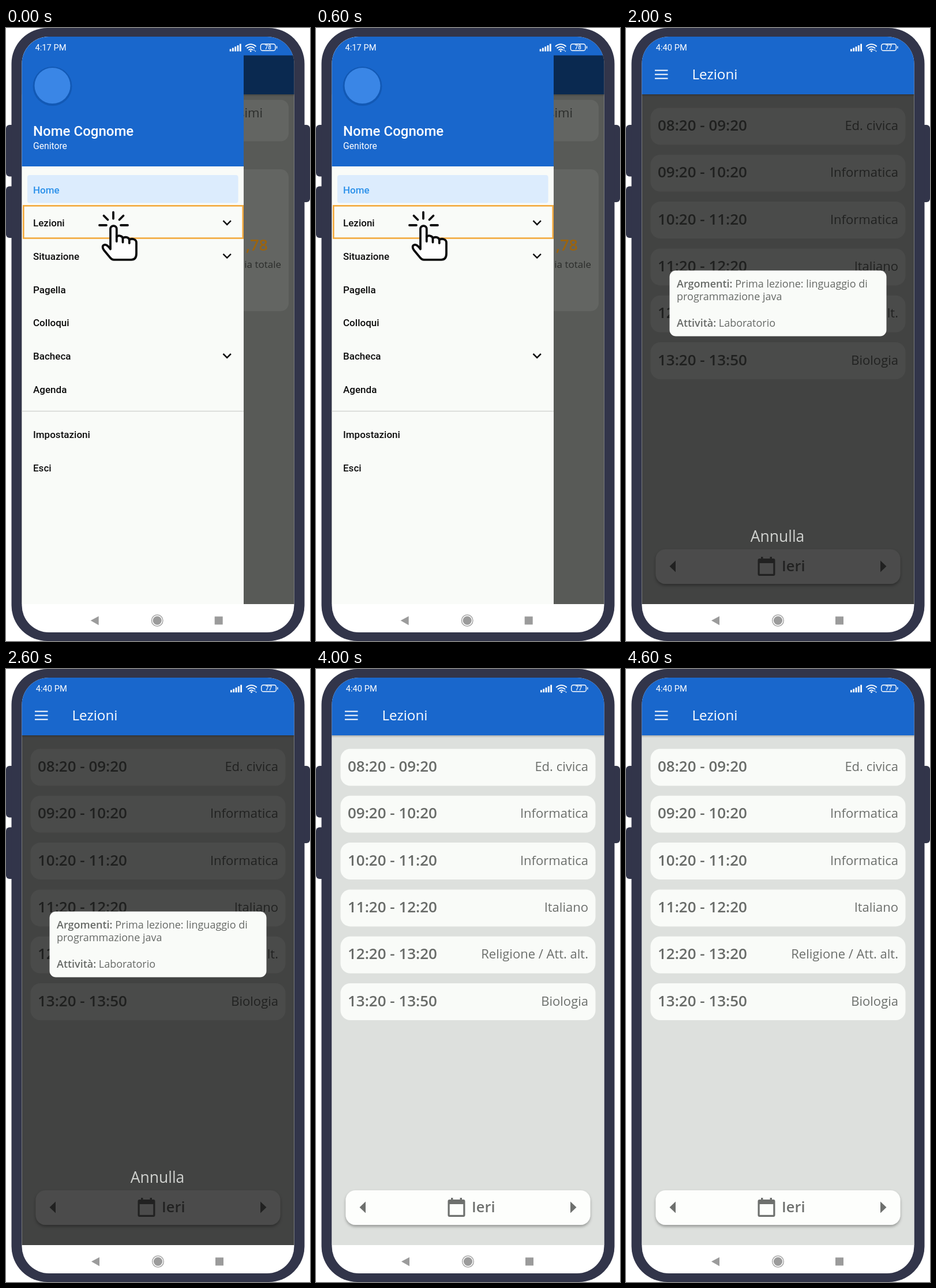
Animation of 527x1063 px, one loop 5000 ms. Source, as an HTML page:

```html
<!DOCTYPE html>
<html lang="it">
<head>
<meta charset="utf-8">
<title>Lezioni</title>
<style>
  html, body { margin: 0; width: 100%; height: 100%; overflow: hidden; background: #fff; }
  svg { display: block; width: 527px; height: 1063px; }
  text { font-family: "Open Sans", "Noto Sans", sans-serif; }
  .ui { font-family: Roboto, sans-serif; }
  .med { font-weight: 500; }
  .semi { font-weight: 600; }
  .end { text-anchor: end; }
  .mid { text-anchor: middle; }
</style>
</head>
<body>
<svg viewBox="0 0 527 1063">
  <defs>
    <clipPath id="screen"><rect x="27.5" y="15" width="472" height="1033" rx="47"/></clipPath>
    <linearGradient id="fade" x2="0" y2="1">
      <stop stop-color="#000" stop-opacity=".22"/>
      <stop offset="1" stop-color="#000" stop-opacity="0"/>
    </linearGradient>
    <filter id="soft" x="-10%" y="-20%" width="120%" height="150%">
      <feDropShadow dx="0" dy="3" stdDeviation="2.5" flood-opacity=".32"/>
    </filter>
    <g id="hand" stroke="#0b0b0b" stroke-width="3.8" stroke-linecap="round" stroke-linejoin="round">
      <path fill="none" d="M186 319.500V330.500M169.500 325.500L176.500 332.500M203.500 325.500L196.500 332.500M162 342H174M199 342H211"/>
      <path fill="#fff" d="M181 383.500V348.500a5.400 5.400 0 0 1 10.800 0V362.500c2-3.500 9.500-3 10.700 2c3.500-3 10-2 11.300 2.600c4-2.500 12.200-1.500 12.200 5.400V391q0 10.800-9 10.800H187q-3.500 0-6-3l-11-13.300c-3-3.800-3.500-8.500.5-9.500c4-1 7.500 3 10.500 7.500Z"/>
      <path fill="none" d="M191.800 361V370M202.500 364.500V371.500M213.800 367V373"/>
    </g>
    <g id="signal" fill="#fff">
      <path d="M389 36.500h2.800v4h-2.800zM393.300 34.500h2.800v6h-2.800zM397.600 32.300h2.800v8.200h-2.800zM401.900 30h2.800v10.500h-2.800zM406.200 27.500h2.800v13h-2.800z"/>
      <g fill="none" stroke="#fff" stroke-width="1.9" stroke-linecap="round">
        <path d="M416.800 31.500a13 13 0 0 1 17.400 0M419.600 34.800a8.800 8.800 0 0 1 11.800 0M422.400 37.900a4.600 4.600 0 0 1 6.200 0"/>
        <rect x="442.700" y="27.700" width="25.600" height="11.600" rx="3.600" stroke-width="1.400"/>
        <path d="M470.800 32V35" stroke-width="1.500"/>
      </g>
      <circle cx="425.500" cy="40" r="1.500"/>
      <path d="M430 39l1.300-2 1.300 2zM432.200 39.500h2.600l-1.300 2z"/>
    </g>
    <g id="nav" fill="#9b9b9b">
      <path d="M148 1027.500L162 1020V1035.500Z"/>
      <circle cx="263.500" cy="1027.500" r="7.600"/>
      <circle cx="263.500" cy="1027.500" r="9.800" fill="none" stroke="#9b9b9b" stroke-width="1.300"/>
      <rect x="363" y="1020.500" width="14" height="14"/>
    </g>
  </defs>

  <g fill="#32354a">
    <rect y="168" width="20" height="89.500" rx="6"/>
    <rect y="274.500" width="20" height="89.500" rx="6"/>
    <rect x="507" y="168" width="20" height="134" rx="6"/>
    <rect x="9.500" width="508" height="1063" rx="62"/>
  </g>

  <g clip-path="url(#screen)">
    <rect x="27" y="15" width="474" height="1034" fill="#fff"/>

    <g id="menu">
      <rect x="27" y="47" width="474" height="952" fill="#585a57"/>
      <rect x="27" y="47" width="474" height="68" fill="#0a2950"/>
      <rect x="27" y="115" width="474" height="4" fill="url(#fade)"/>
      <g fill="#636562">
        <rect x="300" y="124.500" width="190" height="72" rx="14"/>
        <rect x="300" y="245" width="190" height="246" rx="14"/>
      </g>
      <text class="end" x="445" y="155" font-size="22" fill="#2b2d2b">simi</text>
      <text class="end semi" x="454" y="386" font-size="27" fill="#9b640f">,78</text>
      <text class="end" x="477" y="416" font-size="17" fill="#2b2d2b">Media totale</text>
      <rect x="27" y="15" width="385" height="984" fill="#f9fbf8"/>
      <path fill="#1967cc" d="M27 15H501V47.500H412V240H27Z"/>
      <circle cx="80.500" cy="101" r="34" fill="#1259b5"/>
      <circle cx="80.500" cy="100" r="31" fill="#3a86e6"/>
      <text class="ui med" x="47" y="186.500" font-size="24" fill="#fff">Nome Cognome</text>
      <text class="ui" x="47" y="209.500" font-size="15.700" fill="#fff">Genitore</text>
      <rect x="37" y="255" width="365.500" height="48.500" rx="4" fill="#dcecfd"/>
      <g id="items"></g>
      <path d="M27 664.500H412" stroke="#d3d5d2" stroke-width="1.500"/>
      <rect x="30.300" y="308.300" width="380.400" height="56.200" fill="none" stroke="#f3a93c" stroke-width="2.600"/>
      <text class="ui" x="50.500" y="39" font-size="14.700" fill="#fff">4:17 PM</text>
      <use href="#signal" x="-1.300"/>
      <text class="ui med mid" x="454.200" y="37.300" font-size="10" fill="#fff">78</text>
      <use href="#nav" x="-1.300"/>
    </g>

    <g id="lessons">
      <rect x="27" y="115" width="474" height="884" fill="#dde0dd"/>
      <rect x="27" y="115" width="474" height="4" fill="url(#fade)"/>
      <g id="rows"></g>
      <rect x="51.500" y="904" width="424" height="60" rx="17" fill="#fdfefc" filter="url(#soft)"/>
      <g fill="#6e706e">
        <path d="M75.500 933.500L86 923.500V943.500ZM451.500 933.500L441 923.500V943.500Z"/>
        <path fill-rule="evenodd" d="M231.500 920H234V917H237.500V920H249.500V917H253V920H255.500q3 0 3 3V947q0 3-3 3H231.500q-3 0-3-3V923q0-3 3-3ZM231.700 928V946.800H255.300V928Z"/>
        <text class="semi" x="270" y="942" font-size="25.500">Ieri</text>
      </g>
      <rect id="dim" x="27" y="115" width="474" height="884" opacity=".7"/>
      <rect x="27" y="15" width="474" height="100" fill="#1967cc"/>
      <path d="M50 73.500H72.500M50 80.500H72.500M50 87.500H72.500" stroke="#fff" stroke-width="2.200"/>
      <text x="114.500" y="89" font-size="24.200" fill="#fff">Lezioni</text>
      <text class="ui" x="51.800" y="39" font-size="14.700" fill="#fff">4:40 PM</text>
      <use href="#signal"/>
      <text class="ui med mid" x="455.500" y="37.300" font-size="10" fill="#fff">77</text>
      <use href="#nav"/>
    </g>

    <rect id="pick" x="43.300" y="302.300" width="440.400" height="61.400" fill="none" stroke="#f3a93c" stroke-width="2.600"/>

    <g id="dialog" font-size="18" fill="#666966">
      <rect x="75.500" y="420.500" width="376" height="114" rx="11" fill="#f9fbf8"/>
      <text x="88" y="449.500"><tspan class="semi">Argomenti:</tspan> Prima lezione: linguaggio di</text>
      <text x="88" y="471.500">programmazione java</text>
      <text x="88" y="517.500"><tspan class="semi">Attività:</tspan> Laboratorio</text>
      <text class="mid" x="262.500" y="891" font-size="26.500" fill="#d0d2cf">Annulla</text>
    </g>

    <use id="tap" href="#hand"/>
  </g>
</svg>
<script>
const $ = id => document.getElementById(id);

const chevron = y =>
  `<path d="M376.500 ${y - 4}l6.700 6.700 6.700-6.700" fill="none" stroke="#111" stroke-width="2.500"/>`;

const item = (label, y, fill = "#0c0c0c") =>
  `<text class="ui med" x="47" y="${y + 6}" font-size="17" fill="${fill}">${label}</text>`;

const labels = ["Home", "Lezioni", "Situazione", "Pagella", "Colloqui", "Bacheca", "Agenda"];
const expandable = ["Lezioni", "Situazione", "Bacheca"];
$("items").innerHTML = labels.map((label, i) => {
  const y = 280.5 + i * 57.7;
  return item(label, y, i ? undefined : "#2a90ea") + (expandable.includes(label) ? chevron(y) : "");
}).join("") + item("Impostazioni", 705) + item("Esci", 762.5);

const lessons = [
  ["08:20 - 09:20", "Ed. civica"],
  ["09:20 - 10:20", "Informatica"],
  ["10:20 - 11:20", "Informatica"],
  ["11:20 - 12:20", "Italiano"],
  ["12:20 - 13:20", "Religione / Att. alt."],
  ["13:20 - 13:50", "Biologia"]
];
$("rows").innerHTML = lessons.map(([time, subject], i) => {
  const y = 138.5 + i * 81.3;
  return `<rect x="42.500" y="${y}" width="442" height="64" rx="17" fill="#f9fbf8"/>
    <text class="semi" x="55" y="${y + 39.5}" font-size="26" fill="#686b68">${time}</text>
    <text class="end" x="472" y="${y + 38.5}" font-size="22" fill="#6c6f6c">${subject}</text>`;
}).join("");

// One entry per second: visible layers and the hand's offset.
const steps = [
  { show: ["menu"], tap: [0, 0] },
  { show: ["lessons", "pick"], tap: [85.3, 6] },
  { show: ["lessons", "dim", "dialog"] },
  { show: ["lessons", "dim", "dialog"], tap: [69.7, 430] },
  { show: ["lessons"] }
];
const layers = ["menu", "lessons", "pick", "dim", "dialog"];
const toggle = (id, on) => { $(id).style.display = on ? "" : "none"; };

let current = -1;
function draw(ms) {
  const index = Math.floor(ms / 1000) % steps.length;
  if (index === current) return;
  current = index;
  const { show, tap } = steps[index];
  layers.forEach(id => toggle(id, show.includes(id)));
  toggle("tap", tap);
  if (tap) $("tap").setAttribute("transform", `translate(${tap})`);
}

const start = performance.now();
function tick() {
  draw(performance.now() - start);
  requestAnimationFrame(tick);
}
tick();
</script>
</body>
</html>
```
